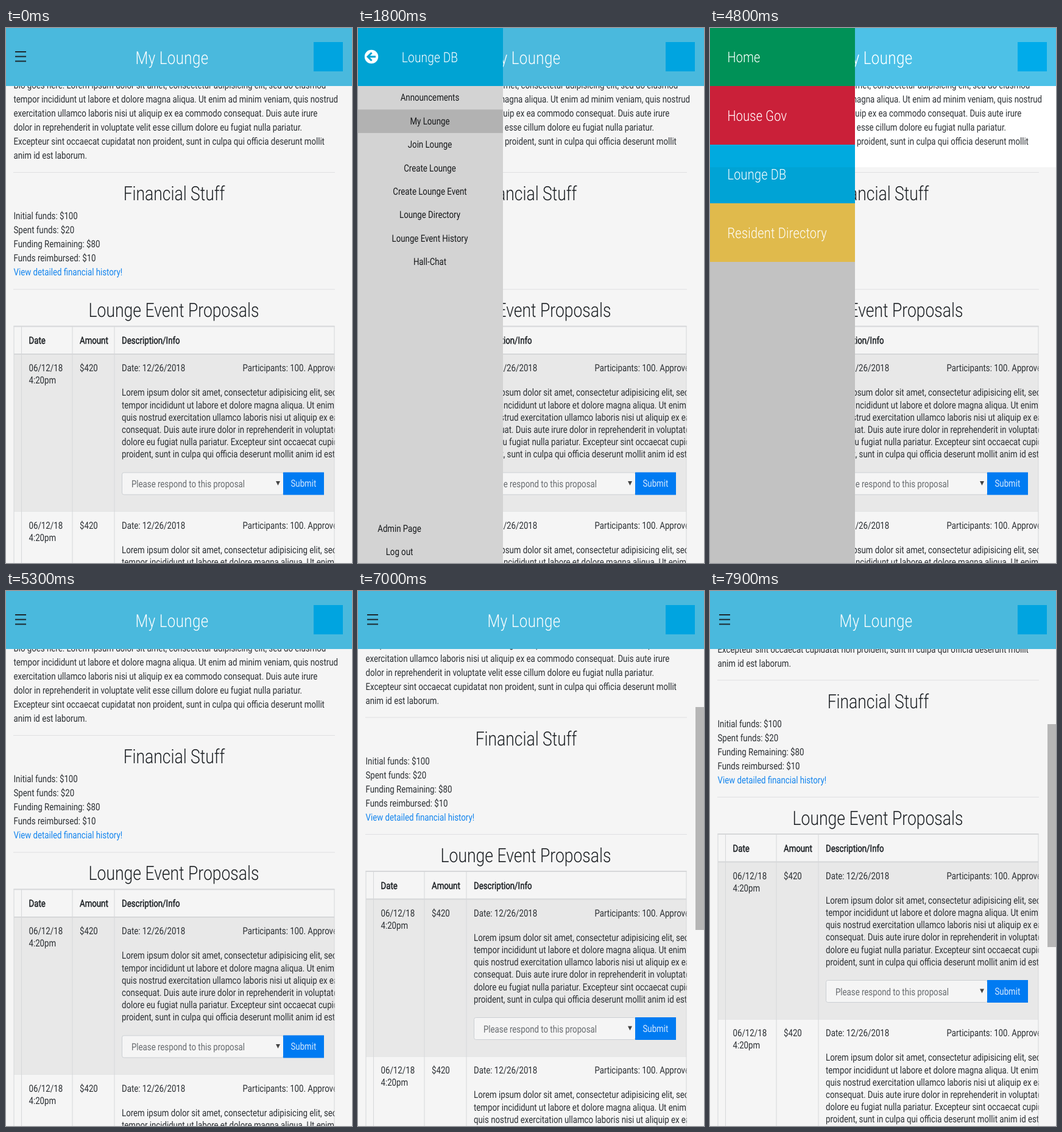
These frames come from a looping animation (568x876 px, 8000 ms). An HTML page:

```html
<!DOCTYPE html>
<html lang="en">
<head>
<meta charset="utf-8">
<title>My Lounge</title>
<style>
  html, body { margin: 0; width: 100%; height: 100%; overflow: hidden; background: #f5f5f5; }
  #stage { position: relative; width: 568px; height: 876px; overflow: hidden; background: #f5f5f5; }
  #stage > * { position: absolute; left: 0; top: 0; }
  svg { display: block; }
  text { font: 16px Roboto, "Open Sans", sans-serif; fill: #2a2e32; white-space: pre; text-rendering: geometricPrecision; }
  .head { font-size: 32px; font-weight: 300; fill: #1c2024; }
  .title { font-size: 29px; font-weight: 300; letter-spacing: .5px; fill: #fff; }
  .tile { font-size: 24px; font-weight: 300; letter-spacing: .3px; fill: #fff; }
  .crest { font-size: 23px; font-weight: 300; letter-spacing: .2px; fill: #fff; }
  .strong { stroke: #1c2024; stroke-width: .5px; fill: #1c2024; }
  .item { fill: #16181a; }
  .link { fill: #1284ee; }
  .hint { fill: #666a6e; }
  .go { fill: #d3e8fd; }

  .panel { width: 0; height: 876px; overflow: hidden; }
  #page, #thumb, #flash, .panel, #cap { animation: 8s step-end infinite; }
  #page { animation-name: scroll; }
  #thumb { left: 554px !important; width: 14px; height: 364.5px; background: #b6b6b6; animation-name: thumb; }
  #menu { background: #d3d3d3; animation-name: menu; }
  #drawer { background: #c2c2c2; animation-name: drawer; }
  #cap { fill: #00a3d3; animation-name: cap; }
  #flash { width: 568px; height: 228px; background: #0b0b0b; mix-blend-mode: color-dodge; visibility: hidden; animation-name: flash; }

  @keyframes scroll {
    0% { transform: none; }
    81.25% { transform: translateY(-1px); animation-timing-function: steps(5, end); }
    87.5% { transform: translateY(-29.5px); animation-timing-function: steps(9, end); }
    98.75%, 100% { transform: translateY(-90.5px); }
  }
  @keyframes thumb {
    0% { transform: translateY(177px); visibility: hidden; }
    81.25% { transform: translateY(177px); visibility: visible; animation-timing-function: steps(5, end); }
    87.5% { transform: translateY(190px); visibility: visible; animation-timing-function: steps(9, end); }
    98.75%, 100% { transform: translateY(218px); visibility: visible; }
  }
  @keyframes menu {
    0% { width: 0; }
    16.25% { width: 30px; }
    17.5% { width: 126px; }
    18.75% { width: 195px; }
    20% { width: 225px; }
    21.25% { width: 236px; }
    22.5% { width: 238px; }
    61.25% { width: 168px; }
    62.5% { width: 76px; }
    63.75% { width: 27px; }
    65% { width: 6px; }
    66.25%, 100% { width: 0; }
  }
  @keyframes drawer {
    0% { width: 0; }
    38.75% { width: 183.5px; }
    40% { width: 219px; }
    41.25% { width: 235px; }
    42.5% { width: 238px; }
    61.25% { width: 168px; }
    62.5% { width: 76px; }
    63.75% { width: 27px; }
    65% { width: 6px; }
    66.25%, 100% { width: 0; }
  }
  @keyframes cap {
    0% { fill: #00a3d3; }
    38.75%, 100% { fill: #0090b6; }
  }
  @keyframes flash {
    0% { visibility: hidden; }
    60% { visibility: visible; }
    61.25%, 100% { visibility: hidden; }
  }
</style>
</head>
<body>
<div id="stage"></div>
<script>
  const NARROW = 0.828; // one condensed ratio for the whole typeface

  const text = (x, y, str, cls = '', anchor = 'start') =>
    `<text class="${cls}" text-anchor="${anchor}" transform="translate(${x} ${y}) scale(${NARROW} 1)">${str}</text>`;
  const mid = (x, y, str, cls) => text(x, y, str, cls, 'middle');
  const rect = (x, y, w, h, fill, extra = '') =>
    `<rect x="${x}" y="${y}" width="${w}" height="${h}" fill="${fill}" ${extra}/>`;
  const lines = (x, y, step, list) => list.map((s, i) => text(x, y + i * step, s)).join('');
  const svg = (w, h, body, id = '') => `<svg id="${id}" width="${w}" height="${h}">${body}</svg>`;

  const RULE = '#dfe0e2', EDGE = '#d6d7d9';

  const bio = [
    'Bio goes here. Lorem ipsum dolor sit amet, consectetur adipisicing elit, sed do eiusmod',
    'tempor incididunt ut labore et dolore magna aliqua. Ut enim ad minim veniam, quis nostrud',
    'exercitation ullamco laboris nisi ut aliquip ex ea commodo consequat. Duis aute irure',
    'dolor in reprehenderit in voluptate velit esse cillum dolore eu fugiat nulla pariatur.',
    'Excepteur sint occaecat cupidatat non proident, sunt in culpa qui officia deserunt mollit',
    'anim id est laborum.'
  ];
  const funds = ['Initial funds: $100', 'Spent funds: $20', 'Funding Remaining: $80', 'Funds reimbursed: $10'];
  const details = [
    'Lorem ipsum dolor sit amet, consectetur adipisicing elit, sed do eiusmod',
    'tempor incididunt ut labore et dolore magna aliqua. Ut enim ad minim',
    'quis nostrud exercitation ullamco laboris nisi ut aliquip ex ea commodo',
    'consequat. Duis aute irure dolor in reprehenderit in voluptate velit',
    'dolore eu fugiat nulla pariatur. Excepteur sint occaecat cupidatat',
    'proident, sunt in culpa qui officia deserunt mollit anim id est laborum.'
  ];

  const row = (y, fill) => `<g transform="translate(0 ${y})">` +
    rect(13, 0, 526, 257, fill) +
    lines(37.5, 27.5, 20.2, ['06/12/18', '4:20pm']) +
    text(121, 27.5, '$420') +
    text(190, 27.5, 'Date: 12/26/2018') +
    text(388.5, 27.5, 'Participants: 100. Approved: 12') +
    lines(190, 67.8, 20.2, details) +
    rect(190.5, 193.5, 265, 36, '#f5f5f5', 'rx="3" stroke="#cbcfd3"') +
    text(206, 217.5, 'Please respond to this proposal', 'hint') +
    '<path d="M443 207.5h7l-3.500 7z" fill="#444"/>' +
    rect(455, 193, 67, 37, '#007bf2') +
    text(467.5, 216.500, 'Submit', 'go') +
    rect(13, 257, 526, 1, EDGE) + '</g>';

  const table = '<defs><clipPath id="frame"><rect x="12" y="480" width="528" height="700"/></clipPath></defs>' +
    '<g clip-path="url(#frame)">' +
    row(534.5, '#e8e8e8') + row(792, '#f5f5f5') +
    [[37.5, 'Date'], [121, 'Amount'], [190, 'Description/Info']].map(([x, s]) => text(x, 517, s, 'strong')).join('') +
    rect(12.5, 487.500, 527, 2, EDGE) + rect(13, 533, 526, 2, EDGE) +
    [12.5, 25, 108.5, 177.5, 538.5].map(x => rect(x, 488, 1, 600, EDGE)).join('') + '</g>';

  const page = lines(12.5, 99, 23, bio) +
    rect(12, 236, 528, 1, RULE) + mid(276, 282, 'Financial Stuff', 'head') +
    lines(12.5, 313, 23, funds) +
    text(12.5, 405, 'View detailed financial history!', 'link') +
    rect(12, 427.5, 528, 1, RULE) + mid(275.5, 473, 'Lounge Event Proposals', 'head') + table;

  const bar = rect(0, 0, 568, 95, '#4ab9dd') +
    [38, 45.7, 53.4].map(y => rect(15, y, 18, 2, '#1d2a30')).join('') +
    mid(272.5, 58.5, 'My Lounge', 'title') +
    rect(505, 23, 48, 48, '#00a4e0');

  const items = ['Announcements', 'My Lounge', 'Join Lounge', 'Create Lounge', 'Create Lounge Event',
    'Lounge Directory', 'Lounge Event History', 'Hall-Chat'];
  const menu = rect(0, 0, 238, 95, '', 'id="cap"').replace('fill=""', '') +
    '<circle cx="22" cy="47" r="11.2" fill="#fff"/>' +
    '<path d="M22.500 40.500L16 47l6.500 6.500M16.500 47H29" fill="none" stroke="#00a3d3" stroke-width="3"/>' +
    mid(118, 55.5, 'Lounge DB', 'crest') +
    rect(0, 133.5, 238, 38.400, '#b2b2b2') +
    items.map((s, i) => mid(118, 119.3 + i * 38.4, s, 'item')).join('') +
    mid(68, 825, 'Admin Page', 'item') + mid(68, 863, 'Log out', 'item');

  const tiles = [['Home', '#008b53'], ['House Gov', '#c11f37'], ['Lounge DB', '#00a3d5'], ['Resident Directory', '#e0ba4c']];
  const drawer = tiles.map(([s, fill], i) =>
    rect(0, i * 96 - 1, 238, 96, fill) + text(28.5, 56 + i * 96, s, 'tile')).join('');

  document.getElementById('stage').innerHTML =
    svg(568, 1060, page, 'page') +
    '<div id="thumb"></div>' +
    svg(568, 95, bar) +
    `<div id="menu" class="panel">${svg(238, 876, menu)}</div>` +
    `<div id="drawer" class="panel">${svg(238, 876, drawer)}</div>` +
    '<div id="flash"></div>';
</script>
</body>
</html>
```
